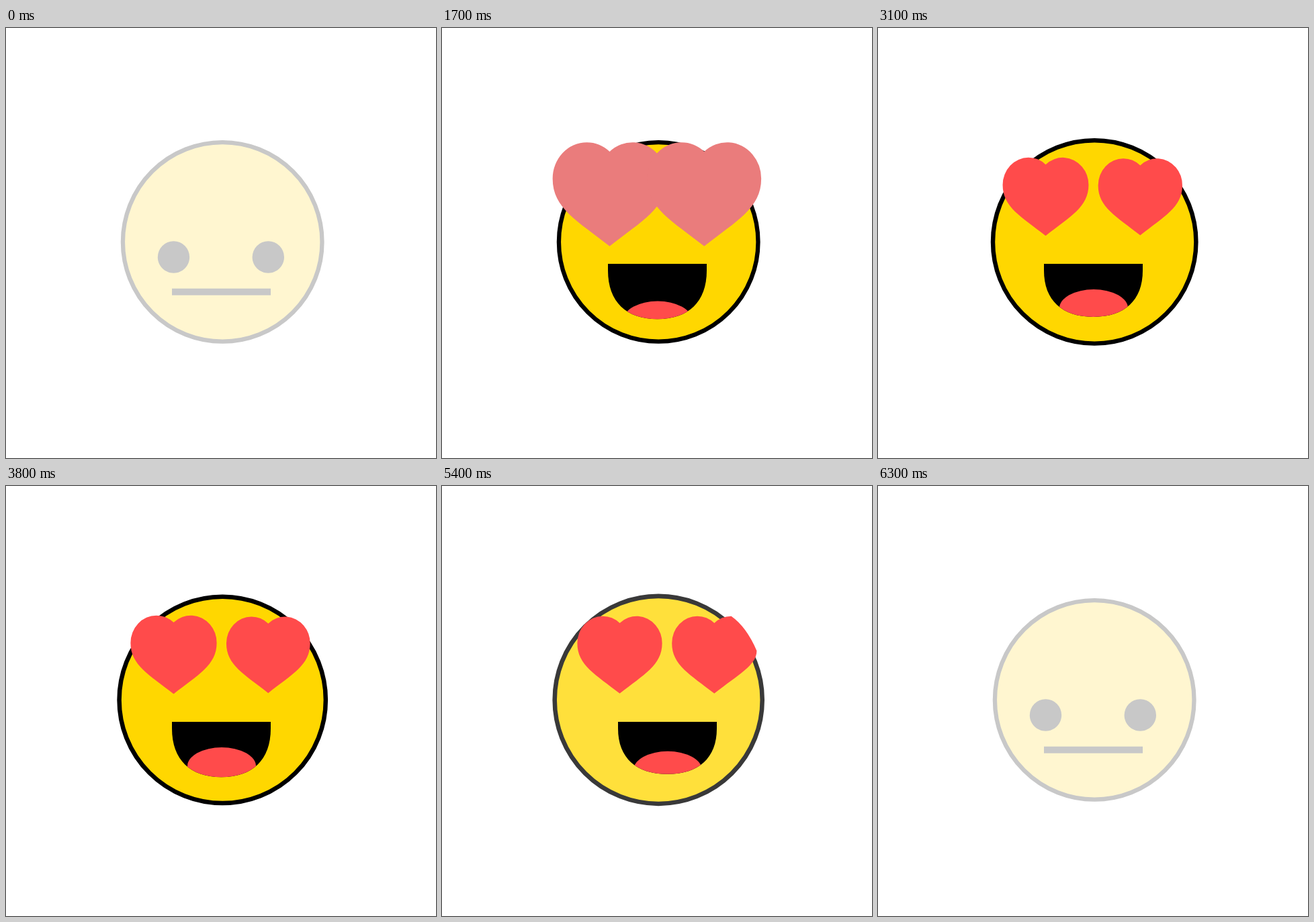
These frames come from a looping animation (640 px wide and 640 px high, 6.8 s). An HTML page with a canvas:

```html
<!DOCTYPE html>
<html lang="en">
<head>
<meta charset="utf-8">
<title>Heart eyes</title>
<style>
  html, body { margin: 0; width: 100%; height: 100%; overflow: hidden; background: #fff; }
  canvas { display: block; width: 640px; height: 640px; }
</style>
</head>
<body>
<canvas width="640" height="640"></canvas>
<script>
const ctx = document.querySelector('canvas').getContext('2d');
const LOOP = 6800, STEP = 100, ROUND = 0.552;
const GREY = [200, 200, 200], BLACK = [0, 0, 0], RED = [255, 75, 75];
const PALE = [255, 246, 208], YELLOW = [255, 215, 0];

const mix = (a, b, k) => a + (b - a) * k;
const rgb = (a, b, k) => `rgb(${a.map((v, i) => Math.round(mix(v, b[i], k)))})`;

// Value at time t along alternating time, value keys with cosine easing.
function track(t, ...keys) {
  if (t <= keys[0]) return keys[1];
  for (let i = 2; i < keys.length; i += 2) {
    if (t < keys[i]) {
      const x = (t - keys[i - 2]) / (keys[i] - keys[i - 2]);
      return mix(keys[i - 1], keys[i + 1], (1 - Math.cos(Math.PI * x)) / 2);
    }
  }
  return keys[keys.length - 1];
}

// Rises from 0 to 1 between a and b, falls back between c and d.
const swell = (t, a, b, c, d) => track(t, a, 0, b, 1, c, 1, d, 0);

function drawFace(t) {
  const scale = track(t, 500, 1, 1000, 0.91, 1400, 1.047, 1700, 1,
    4950, 1.05, 5150, 1.05, 6100, 1);
  const k = swell(t, 900, 1600, 5010, 6100);
  ctx.beginPath();
  ctx.arc(322.2, 318.4, 148.3 * scale, 0, 2 * Math.PI);
  ctx.fillStyle = rgb(PALE, YELLOW, k);
  ctx.fill();
  ctx.lineWidth = 6.3 * scale;
  ctx.strokeStyle = rgb(GREY, BLACK, k);
  ctx.stroke();
}

function drawMouth(t, cx) {
  const w = 73.5;
  const top = mix(387.7, 351, swell(t, 650, 1600, 5500, 6200));
  const open = swell(t, 900, 1700, 6050, 6300);
  const depth = open * (70 + 2.2 * Math.cos((t - 1700) / 1050 * 2 * Math.PI));
  const side = top + 10, bottom = side + depth;
  const handleX = mix(49, w, open), handleY = side + depth * 0.65;
  ctx.save();
  ctx.beginPath();
  ctx.moveTo(cx - w, top);
  ctx.lineTo(cx + w, top);
  ctx.lineTo(cx + w, side);
  ctx.bezierCurveTo(cx + handleX, handleY, cx + 46, bottom, cx, bottom);
  ctx.bezierCurveTo(cx - 46, bottom, cx - handleX, handleY, cx - w, side);
  ctx.closePath();
  ctx.fillStyle = rgb(GREY, BLACK, swell(t, 900, 1600, 5500, 6200));
  ctx.fill();

  const tongue = swell(t, 1400, 1920, 5250, 5900);
  if (tongue > 0) {
    ctx.clip();
    ctx.beginPath();
    ctx.ellipse(cx + 0.5, top + mix(112, 66, tongue), 51, 28, 0, 0, 2 * Math.PI);
    ctx.fillStyle = rgb(RED, RED, 0);
    ctx.fill();
  }
  ctx.restore();
}

// Two round lobes over a tip: a circle when heart is 0, a heart when it is 1.
function drawEye(t, x, side, flat) {
  const heart = swell(t, 1100, 1650, 6100, 6300);
  const shrink = swell(t, 500, 1100, 3000, 3100);
  const beat = Math.max(0, Math.sin((t - 2300) / 3100 * Math.PI));
  const s = track(t, 1100, 0.5, 1700, 1.257, 2540, 0.938, 5400, 0.935, 6100, 0.55)
    - side * 0.013 * beat;
  const r = mix(23.7, 9, shrink);
  const blend = (dot, full) => mix(dot, full * s, heart);

  const dx = blend(0, 27), rx = blend(r, 40.5), ry = blend(r, 43);
  const edge = dx + rx, notch = Math.acos(-dx / rx);
  const lift = track(t, 5500, 0, 6100, -38);

  ctx.save();
  ctx.translate(x + 5 * shrink * (1 - heart),
    mix(341 - 20 * shrink, 262 - 30 * s + lift, heart));
  const handle = blend(r * ROUND, 35), tip = blend(r, 80);
  const tipX = blend(r * ROUND, 38), tipY = blend(r, 50);
  ctx.beginPath();
  ctx.ellipse(dx, 0, rx, ry, 0, -notch, flat ? -Math.PI / 2 : 0);
  if (flat) ctx.quadraticCurveTo(dx + rx * 0.6, -ry * 0.6, edge, ry * 0.28);
  ctx.bezierCurveTo(edge, handle, tipX, tipY, 0, tip);
  ctx.bezierCurveTo(-tipX, tipY, -edge, handle, -edge, 0);
  ctx.ellipse(-dx, 0, rx, ry, 0, -Math.PI, notch - Math.PI);
  ctx.closePath();
  ctx.fillStyle = rgb(GREY, RED, swell(t, 900, 2300, 5450, 6200));
  ctx.fill();
  ctx.restore();
}

function draw(now) {
  const t = Math.floor(now / STEP) * STEP % LOOP;
  const shift = track(t, 5000, 0, 5400, 15, 6100, -12, 6300, 0);
  ctx.clearRect(0, 0, 640, 640);
  drawFace(t);
  drawMouth(t, 320.5 + shift);
  drawEye(t, 249.5 + shift, -1, false);
  // The outer lobe flattens at the far end of the swing.
  drawEye(t, 390.3 + shift, 1, shift > 14);
}

const start = performance.now();
function tick() {
  draw(performance.now() - start);
  requestAnimationFrame(tick);
}
tick();
</script>
</body>
</html>
```
